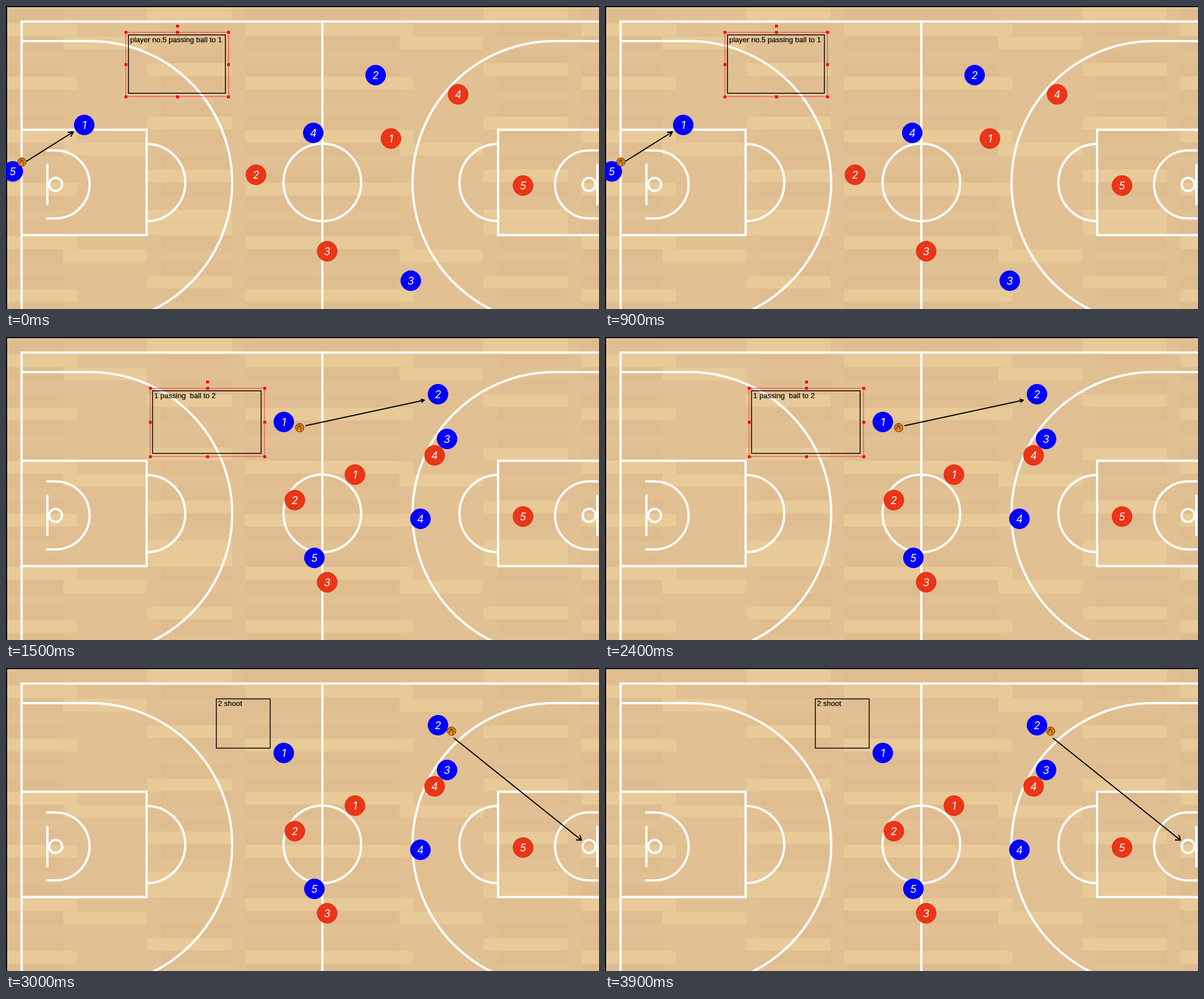
Write an HTML page that moves like this. It is 1046 by 535 pixels and loops after 4.5 s.

```html
<!DOCTYPE html>
<html lang="en">
<head>
<meta charset="utf-8">
<title>Passing drill</title>
<style>
html, body { margin: 0; width: 100%; height: 100%; overflow: hidden; background: #e1c093; }
svg { display: block; width: 1046px; height: 535px; }
.lines { fill: none; stroke: #fff; stroke-width: 4; stroke-linecap: round; }
.num { font: italic 18.5px Inter, "Open Sans", sans-serif; fill: #fff; text-anchor: middle; }
.note { font: 13px "Liberation Sans", Arial, sans-serif; fill: #000; stroke: #000; stroke-width: .2; white-space: pre; }
.box { fill: none; stroke: #000; stroke-width: 1.5; }
.pick { fill: none; stroke: #f33; stroke-width: 1; }
.arrow { fill: none; stroke: #000; stroke-width: 2; stroke-linecap: round; stroke-linejoin: round; }
</style>
</head>
<body>
<svg id="stage" viewBox="0 0 1046 535">
  <g id="floor" shape-rendering="crispEdges"></g>
  <defs>
    <g id="half">
      <path d="M558 27.5H27.5V560"/>
      <path d="M27.5 62H149A250 250 0 0 1 149 562"/>
      <path d="M27.5 218.5H248V404.5H27.5" stroke-linejoin="miter"/>
      <path d="M248 243.5A68 68 0 0 1 248 380"/>
      <path d="M72.5 255H87.5A60 60 0 0 1 87.5 375H72.5M73 280V350"/>
      <circle cx="87.5" cy="315" r="11.5"/>
    </g>
    <g id="ball">
      <circle r="7.5" fill="#ef8a22" stroke="#5b3108" stroke-width="1"/>
      <path d="M-7 2Q-1 -3 6 -4M-3 -7Q3 -1 3 7M-6 -4Q0 -3 7 3M-5 5Q-3 0 2 -7" fill="none" stroke="#5b3108" stroke-width=".9"/>
    </g>
  </defs>
  <g class="lines">
    <use href="#half"/>
    <use href="#half" transform="matrix(-1 0 0 1 1116 0)"/>
    <path d="M558 27.5V560"/>
    <circle cx="558" cy="311.5" r="68.5"/>
  </g>
  <path d="M0 1H1046M1 0V535" stroke="#000" stroke-width="2"/>
  <g id="scenes"></g>
</svg>
<script>
const NS = "http://www.w3.org/2000/svg";
const STEP = 1500;
const BLUE = "#0000ff", RED = "#eb3517";

function add(parent, tag, attrs, text) {
  const el = document.createElementNS(NS, tag);
  for (const key in attrs) el.setAttribute(key, attrs[key]);
  if (text) el.textContent = text;
  parent.append(el);
  return el;
}

// Planks repeat every 593px across and every 16 rows down.
const floor = document.getElementById("floor");
const ROW = 23.45, TILE = 593;
const plankKinds = {
  A: [249, 398], B: [422, 719], C: [101, 249]
};
const plankRows = "ABC.AB..ABC.AB.A";

function plank(x1, x2, y, fill) {
  add(floor, "rect", { x: x1, y, width: x2 - x1, height: ROW + .5, fill });
}

for (let row = -1; row < 23; row++) {
  const y = 7 + row * ROW;
  const kind = plankRows[(row + 16) % 16];
  plank(0, 1046, y, "#e1c093");
  for (let x = -TILE; x < 1046; x += TILE) {
    if (row % 2) plank(x + 274, x + 398, y, "#dfbd90");
    else plank(x + 422, x + 694, y, "#dfbd90");
    if (plankKinds[kind]) plank(x + plankKinds[kind][0], x + plankKinds[kind][1], y, "#e7ca97");
  }
  plank(0, 1046, y + ROW - .5, "none");
  add(floor, "path", { d: `M0 ${y}H1046`, stroke: "#d9b888", "stroke-opacity": .45 });
}

// Player places are listed in order of shirt number.
const lateBlue = [[490, 150], [762, 101], [778, 180], [731, 321], [544, 390]];
const lateRed = [[615.5, 243], [509.5, 288], [566.5, 433], [756, 209], [912, 317]];
const scenes = [
  {
    blue: [[138, 210], [652, 122], [714, 485], [542, 224], [12, 292]],
    red: [[679, 234], [441, 298], [566.5, 433], [797.5, 156], [912, 317]],
    ball: [28, 275.5],
    arrow: "M34 275.5L119 222M110 223L119 222L114.5 230",
    box: [216, 51, 387, 154], pick: [211.5, 46.5, 392.5, 160],
    note: "player no.5 passing ball to 1"
  },
  {
    blue: lateBlue, red: lateRed,
    ball: [518, 160],
    arrow: "M529 156.5L738 111.5M732 110L738 111.5L733.5 115",
    box: [258.5, 95, 450, 205.5], pick: [254, 90.5, 456, 211],
    note: "1 passing  ball to 2"
  },
  {
    blue: lateBlue, red: lateRed,
    ball: [786, 111.5],
    arrow: "M790.5 124L1015 304M1012.5 295.5L1015 304L1006 303.5",
    box: [371, 54.5, 466, 141.5],
    note: "2 shoot"
  }
];

function rect(g, cls, [x1, y1, x2, y2]) {
  add(g, "rect", { class: cls, x: x1, y: y1, width: x2 - x1, height: y2 - y1 });
}

function drawPick(g, area) {
  const [x1, y1, x2, y2] = area;
  const mx = (x1 + x2) / 2, my = (y1 + y2) / 2;
  rect(g, "pick", area);
  const grips = [[mx, y1 - 11], [x1, y1], [mx, y1], [x2, y1], [x1, my], [x2, my], [x1, y2], [mx, y2], [x2, y2]];
  for (const [x, y] of grips)
    add(g, "rect", { x: Math.round(x - 2.5), y: Math.round(y - 2.5), width: 5, height: 5, fill: "#f00" });
}

function drawTeam(g, places, fill, stroke) {
  places.forEach(([x, y], i) => {
    add(g, "circle", { cx: x, cy: y, r: 17.6, fill, stroke });
    add(g, "text", { class: "num", x, y: y + 6.5 }, String(i + 1));
  });
}

const root = document.getElementById("scenes");
const groups = scenes.map(s => {
  const g = add(root, "g", {});
  rect(g, "box", s.box);
  add(g, "text", { class: "note", x: s.box[0] + 3, y: s.box[1] + 12.5 }, s.note);
  if (s.pick) drawPick(g, s.pick);
  drawTeam(g, s.red, RED, "#e02412");
  drawTeam(g, s.blue, BLUE, BLUE);
  add(g, "path", { class: "arrow", d: s.arrow });
  add(g, "use", { href: "#ball", x: s.ball[0], y: s.ball[1] });
  return g;
});

function show() {
  const now = Math.floor(performance.now() / STEP) % groups.length;
  groups.forEach((g, i) => g.style.display = i === now ? "" : "none");
  requestAnimationFrame(show);
}
show();
</script>
</body>
</html>
```
